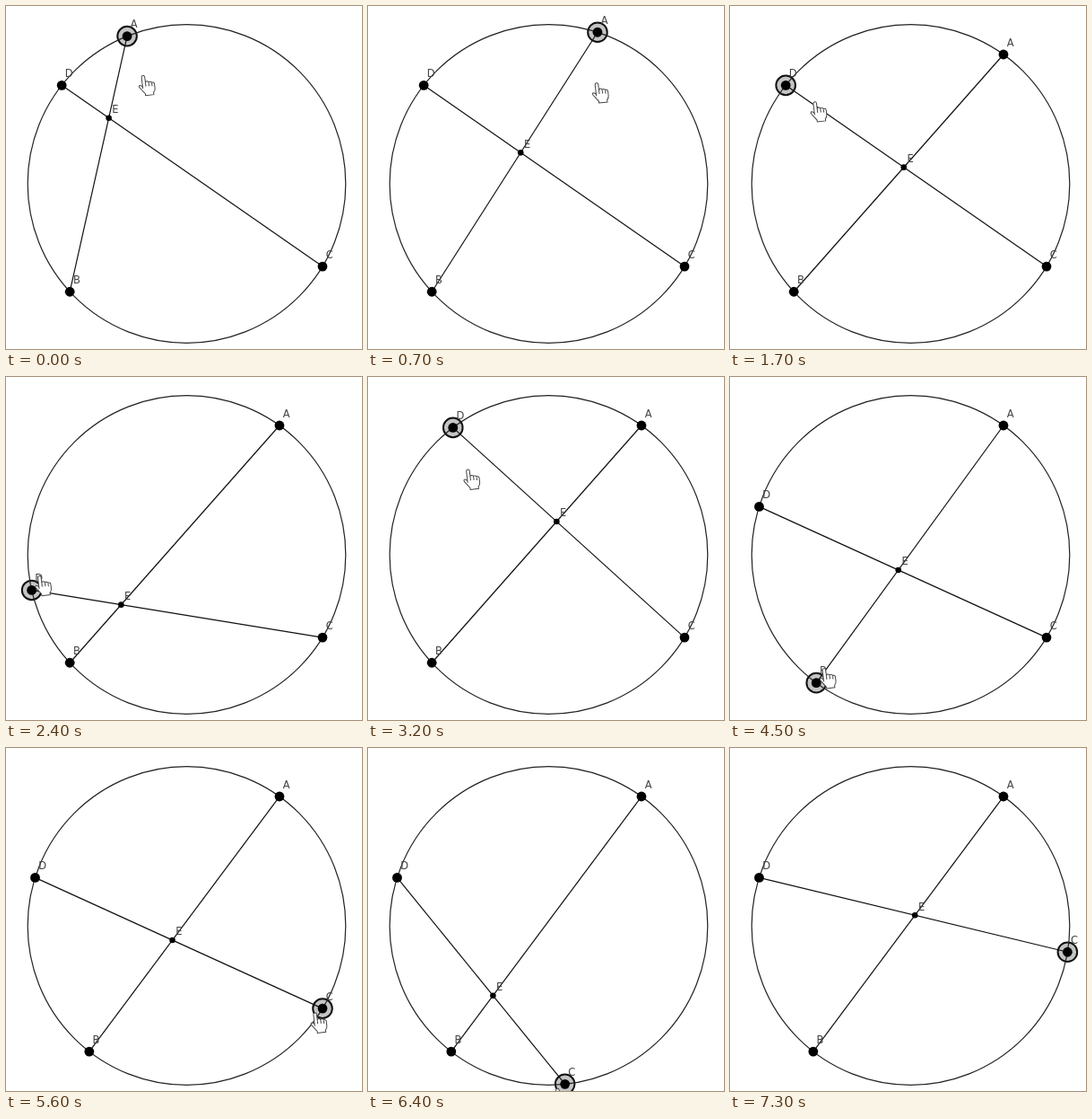
These frames come from a looping animation (397 px wide and 382 px high, 8.9 s). An HTML page with a canvas:

```html
<!DOCTYPE html>
<html lang="en">
<head>
<meta charset="utf-8">
<title>Intersecting chords</title>
<style>
html, body { margin: 0; width: 100%; height: 100%; overflow: hidden; background: #fff; }
canvas { display: block; }
</style>
</head>
<body>
<canvas id="stage" width="397" height="382"></canvas>
<script>
const ctx = document.getElementById('stage').getContext('2d');
const LOOP = 8900, STEP = 100, HAND_END = 7300;
const CX = 201.5, CY = 198, R = 177.3;

// Each drag swings a point between turning angles: [ms, degrees counter-clockwise].
// The grip is where the hand sits relative to its point.
const drags = [
  { name: 'A', turns: [[200, 112], [1000, 54.3]], grip: [0, 0] },
  { name: 'D', turns: [[1730, 141.8], [2100, 232.3], [2900, 104.5], [3600, 162.4]], grip: [13, -5] },
  { name: 'B', turns: [[3900, 222.7], [4200, 300], [4530, 232.2]], grip: [13, -5] },
  { name: 'C', turns: [[5600, 328.7], [6250, 268], [7000, 350.5]], grip: [-4, 16] }
];
for (const d of drags) {
  d.start = d.turns[0][0];
  d.end = d.turns[d.turns.length - 1][0];
}

const handShape = new Path2D('M-5 3V-9.5q0-2 1.8-2t1.8 2V-3q0-1.7 1.8-1.7t1.8 1.9' +
  'q0-1.2 1.8-1t1.6 1.8q.3-1 1.6-.6t1.2 1.8V4q0 3-2 4.5V11H-3V9L-8.5 1.5' +
  'q-1-2 .5-2.5q1.3-.2 3 2z');
const fingers = new Path2D('M-1.4-3V1M2.2-2.8V1M5.6-1.8V1.5');

const mix = (a, b, u) => a + (b - a) * u;
const ease = u => (1 - Math.cos(Math.PI * Math.min(1, Math.max(0, u)))) / 2;

function angleAt(drag, t) {
  return drag.turns.reduce((angle, [ms, next], i) => {
    if (!i) return next;
    const from = drag.turns[i - 1][0];
    return mix(angle, next, ease((t - from) / (ms - from)));
  }, 0);
}

function polar(deg, r = R) {
  const a = deg * Math.PI / 180;
  return { x: CX + r * Math.cos(a), y: CY - r * Math.sin(a) };
}

// The higher the point, the further the hand strays inward and ahead of it
function reach(drag, t) {
  const up = Math.max(0, Math.sin(angleAt(drag, t) * Math.PI / 180));
  const p = polar(angleAt(drag, t + 140 * up), R * (1 - 0.36 * up));
  return { x: p.x + drag.grip[0], y: p.y + drag.grip[1] };
}

function handAt(t) {
  const found = drags.findIndex(d => t < d.end + 100);
  const i = found < 0 ? drags.length - 1 : found;
  const here = reach(drags[i], t);
  if (!i) return here;
  const prev = drags[i - 1], left = prev.end + 100;
  const u = ease((t - left) / (drags[i].start - 100 - left));
  const from = reach(prev, t);
  return { x: mix(from.x, here.x, u), y: mix(from.y, here.y, u) };
}

function crossing(a, b, c, d) {
  const ux = b.x - a.x, uy = b.y - a.y, vx = d.x - c.x, vy = d.y - c.y;
  const det = ux * vy - uy * vx;
  const s = ((c.x - a.x) * vy - (c.y - a.y) * vx) / det;
  const q = ((c.x - a.x) * uy - (c.y - a.y) * ux) / det;
  return s >= 0 && s <= 1 && q >= 0 && q <= 1 ? { x: a.x + s * ux, y: a.y + s * uy } : null;
}

function disc(p, r, fill, stroke, width) {
  ctx.beginPath();
  ctx.arc(p.x, p.y, r, 0, 2 * Math.PI);
  if (fill) { ctx.fillStyle = fill; ctx.fill(); }
  if (stroke) { ctx.strokeStyle = stroke; ctx.lineWidth = width; ctx.stroke(); }
}

function chord(p, q) {
  ctx.beginPath();
  ctx.moveTo(p.x, p.y);
  ctx.lineTo(q.x, q.y);
  ctx.strokeStyle = '#111';
  ctx.lineWidth = 1.2;
  ctx.stroke();
}

function point(name, p, r, rise) {
  disc(p, r, '#000');
  ctx.fillStyle = '#444';
  ctx.fillText(name, p.x + 3.7, p.y - rise);
}

function drawHand({ x, y }) {
  ctx.save();
  ctx.translate(x, y);
  ctx.rotate(-0.12);
  ctx.fillStyle = '#fff';
  ctx.strokeStyle = '#444';
  ctx.lineWidth = 1;
  ctx.fill(handShape);
  ctx.stroke(handShape);
  ctx.stroke(fingers);
  ctx.restore();
}

function draw(t) {
  ctx.fillStyle = '#fff';
  ctx.fillRect(0, 0, 397, 382);
  ctx.font = '11.5px "DejaVu Sans", sans-serif';

  const pts = {};
  for (const d of drags) pts[d.name] = polar(angleAt(d, t));
  const { A, B, C, D } = pts;
  const held = drags.find(d => t >= d.start - 300 && (t < d.end + 100 || d.name === 'C'));

  if (held) disc(pts[held.name], 10.8, '#c4c4c4', '#111', 2);
  disc({ x: CX, y: CY }, R, null, '#222', 1.2);
  chord(A, B);
  chord(C, D);
  for (const name in pts) point(name, pts[name], 5.4, 9.3);
  const E = crossing(A, B, C, D);
  if (E) point('E', E, 3.3, 5.5);
  if (t < HAND_END) drawHand(handAt(t));
}

const start = performance.now();
function tick() {
  const t = (performance.now() - start) % LOOP;
  draw(Math.floor(t / STEP) * STEP);
  requestAnimationFrame(tick);
}
tick();
</script>
</body>
</html>
```
